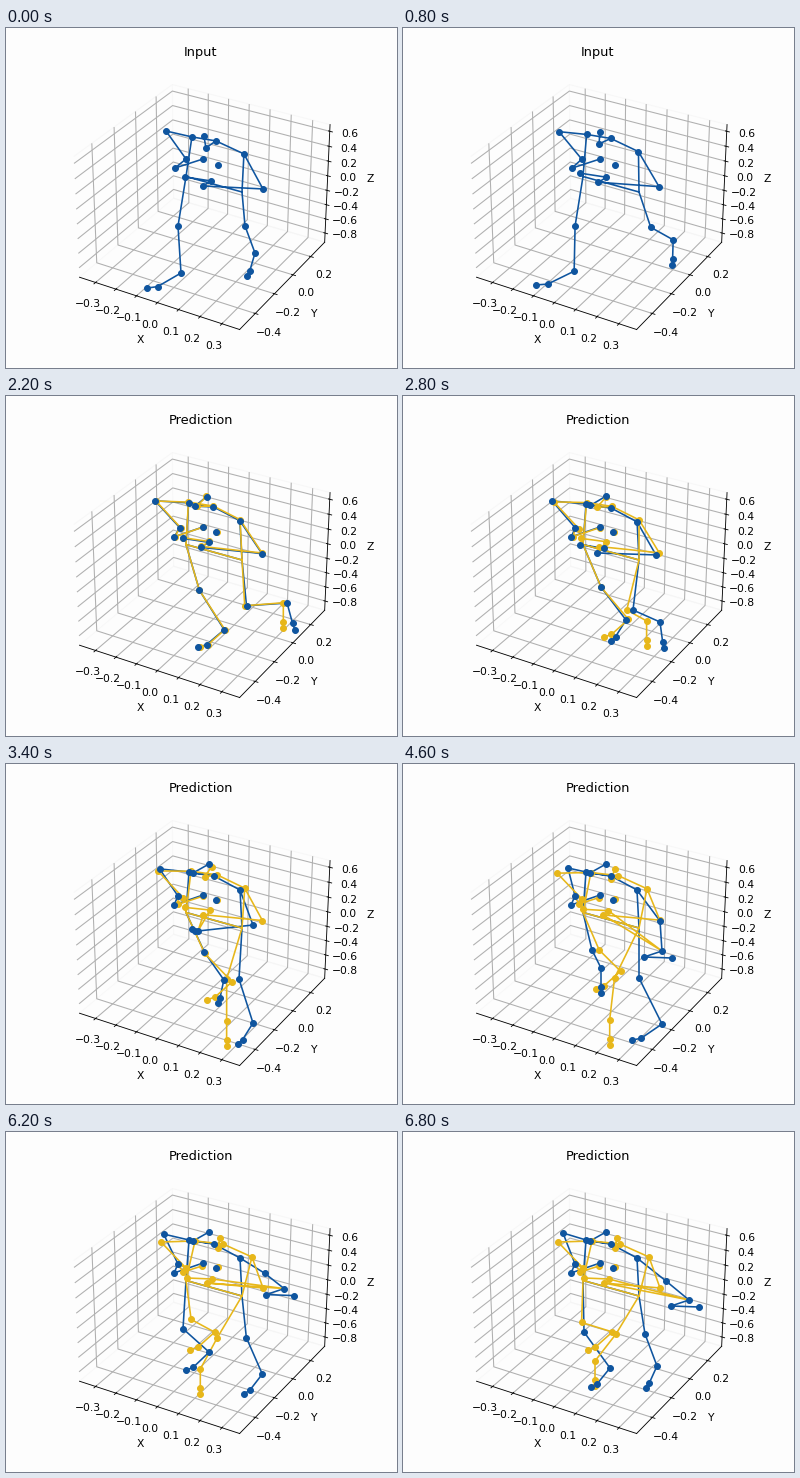
These frames come from a looping animation (391 px wide and 340 px high, 7000 ms). A matplotlib script:

```python
import matplotlib.pyplot as plt
import numpy as np
from matplotlib.animation import FuncAnimation

W, H, DPI = 391, 340, 77
FRAMES, STEP_MS = 35, 200
FIRST_PREDICTION = 10
PAPER, BLUE, YELLOW = "#fdfdfd", "#0f559f", "#e7b71a"

CHAINS = [
    ("l_hip", "l_knee", "l_ankle", "l_foot", "l_toe"),
    ("r_hip", "r_knee", "r_ankle", "r_foot", "r_toe"),
    ("l_shoulder", "l_hip", "r_hip", "r_shoulder"),
    ("l_shoulder", "neck", "r_shoulder"),
    ("neck", "nose", "head"),
    ("l_shoulder", "l_elbow", "l_wrist", "l_anchor", "l_hand", "l_thumb"),
    ("r_shoulder", "r_elbow", "r_wrist", "r_anchor", "r_hand", "r_thumb"),
]
HIPS = {"l_hip": np.array([180, 148.5]), "r_hip": np.array([236, 164])}

# Upper body: where each joint starts and where it settles
TRUNK = {
    "head": ((198, 108), (203, 100)),
    "nose": ((200, 120), (187, 109)),
    "neck": ((210, 113), (208, 112)),
    "l_shoulder": ((186, 109), (183, 108)),
    "r_shoulder": ((238, 126), (234, 126)),
}
LEFT_HAND = {
    "spine": ((212, 137), (210, 136)),
    "l_wrist": ((180, 131), (172, 132)),
    "l_hand": ((169, 140), (168, 141)),
    "l_thumb": ((197, 131), (197, 131)),
}

# Key points, by step
L_ELBOW = {0: (160, 103), 15: (150, 105), 23: (165, 104), 28: (157, 103),
           34: (160, 101)}
R_ELBOW = {0: (257, 161), 14: (253, 159), 17: (247, 161), 23: (257, 157),
           27: (255, 138), 34: (263, 149)}
R_WRIST = {0: (197, 158), 14: (194, 157), 17: (192, 167), 23: (259, 187),
           27: (268, 153), 34: (286, 168)}
# Knee x, y, ankle x, y and forward tilt of the foot
L_LEG = {0: (172, 198, 175, 245, 0.9), 3: (170, 198, 166, 243, 1),
         7: (183, 198, 200, 244, 1), 14: (198, 191, 223, 224, 0.4),
         23: (189, 186, 198, 204, 0), 27: (176, 192, 199, 204, 0.6),
         34: (181, 200, 207, 236, 0.5)}
R_LEG = {0: (239, 198, 249, 225, 0.2), 7: (250, 202, 282, 205, -0.1),
         10: (244, 208, 286, 204, -0.2), 14: (230, 214, 257, 226, -0.1),
         17: (233, 215, 247, 259, 0.4), 23: (236, 214, 259, 260, 0.8),
         34: (242, 202, 254, 234, 0.3)}

# Average pose that the prediction fades into
REST = {
    "head": (214, 106), "nose": (212, 116), "neck": (217, 112),
    "spine": (212, 135), "l_shoulder": (189, 109), "r_shoulder": (246, 125),
    "l_elbow": (155, 110), "l_wrist": (180, 136), "l_hand": (177, 140),
    "l_thumb": (196, 134), "r_elbow": (257, 156), "r_wrist": (201, 151),
    "r_hand": (206, 147), "r_thumb": (181, 146),
}


def ease(x):
    x = min(max(x, 0), 1)
    return x * x * (3 - 2 * x)


def mix(a, b, amount):
    return np.array(a) * (1 - amount) + np.array(b) * amount


def follow(keys, k):
    """Smooth curve through the key points."""
    t = np.array(list(keys), float)
    points = np.array(list(keys.values()), float)
    slopes = np.gradient(points, t, axis=0)
    i = int(np.clip(np.searchsorted(t, k, "right") - 1, 0, len(t) - 2))
    h = t[i + 1] - t[i]
    u = (k - t[i]) / h
    return (mix(points[i], points[i + 1], ease(u))
            + h * u * (1 - u) * ((1 - u) * slopes[i] - u * slopes[i + 1]))


def leg(side, knee, ankle, tilt):
    return {side + "_knee": knee,
            side + "_ankle": ankle,
            side + "_foot": ankle + (-26 * tilt, 19 - 6 * tilt),
            side + "_toe": ankle + (-38 * tilt, 25 - 11 * tilt)}


def recorded(k):
    settle = ease(k / 16)
    lift = np.array([-4, -5]) * np.exp(-((k - 7) / 3.5) ** 2)
    pose = {name: mix(*ends, settle) + lift for name, ends in TRUNK.items()}
    pose |= {name: mix(*ends, settle) for name, ends in LEFT_HAND.items()}

    turn = ease((k - 13) / 9)
    wrist = follow(R_WRIST, k) + lift / 2
    pose["l_elbow"] = follow(L_ELBOW, k)
    pose["r_elbow"] = follow(R_ELBOW, k) + lift / 2
    pose["r_wrist"] = wrist
    pose["r_hand"] = wrist + mix((8, -5), (-18, 6), turn)
    pose["r_thumb"] = wrist + mix((-18, -9), (10, 7), turn)

    for side, keys in (("l", L_LEG), ("r", R_LEG)):
        now = follow(keys, k)
        pose |= leg(side, now[:2], now[2:4], now[4])
    return pose


def predicted(k):
    drift = ease((k - 8) / 20)
    start = recorded(FIRST_PREDICTION)
    pose = {name: mix(start[name], rest, drift) for name, rest in REST.items()}

    # The left leg slows down, the right one swings too far
    left = follow(L_LEG, min(k, 14 + 0.6 * (k - 14)))
    right = follow(R_LEG, k)
    pose |= leg("l", left[:2], left[2:4] + drift * np.array([11, -3]), 0.65)
    pose |= leg("r", right[:2] + drift * np.array([-29, 0]),
                right[2:4] + drift * np.array([-62, -5]), 0)
    return pose


def bones(joints, anchors):
    """All chains as one polyline, with gaps between them."""
    known = {**joints, **HIPS,
             "l_anchor": anchors["l_wrist"], "r_anchor": anchors["r_wrist"]}
    rows = []
    for chain in CHAINS:
        rows += [known[name] for name in chain] + [np.full(2, np.nan)]
    return np.array(rows).T


plt.rcParams["grid.linewidth"] = 1
# The small surplus keeps rounding from losing a pixel
fig = plt.figure(figsize=((W + 0.001) / DPI, (H + 0.001) / DPI), dpi=DPI,
                 facecolor=PAPER)

SIDE, LEFT, TOP = 285, 52, 34.5
room = fig.add_axes([LEFT / W, 1 - (TOP + SIDE) / H, SIDE / W, SIDE / H],
                    projection="3d", facecolor=PAPER)
room.view_init(elev=30, azim=-60)
room.set(xlim=(-0.38, 0.38), ylim=(-0.557, 0.363), zlim=(-0.932, 0.689),
         xlabel="X", ylabel="Y", zlabel="Z",
         xticks=np.linspace(-0.3, 0.3, 7).round(1),
         yticks=np.linspace(-0.4, 0.2, 4).round(1),
         zticks=np.linspace(-0.8, 0.6, 8).round(1))
for axis in (room.xaxis, room.yaxis, room.zaxis):
    axis.pane.set_facecolor(PAPER)
    axis.pane.set_edgecolor("#f2f2f2")
title = room.set_title("Input", y=1)
title.set_y(1)  # 3D axes lower their titles

stage = fig.add_axes([0, 0, 1, 1])
stage.set(xlim=(0, W), ylim=(H, 0))
stage.axis("off")


def make_figure(color, line_order, dot_order):
    line, = stage.plot([], [], color=color, lw=1.5, zorder=line_order)
    dots, = stage.plot([], [], "o", color=color, ms=5.5, zorder=dot_order)
    return line, dots


def place(figure, joints, anchors):
    line, dots = figure
    line.set_data(*bones(joints, anchors))
    dots.set_data(*np.array(list(joints.values())).T)


truth = make_figure(BLUE, 2, 5)
guess = make_figure(YELLOW, 3, 4)


def draw(k):
    predicting = k >= FIRST_PREDICTION
    title.set_text("Prediction" if predicting else "Input")

    real = recorded(k)
    place(truth, real, real)
    # The predicted hands stay tied to the recorded wrists
    place(guess, predicted(k), real)
    for artist in guess:
        artist.set_visible(predicting)
    return *truth, *guess, title


anim = FuncAnimation(fig, draw, frames=FRAMES, interval=STEP_MS,
                     repeat=True, repeat_delay=0, blit=False)
plt.show()
```
